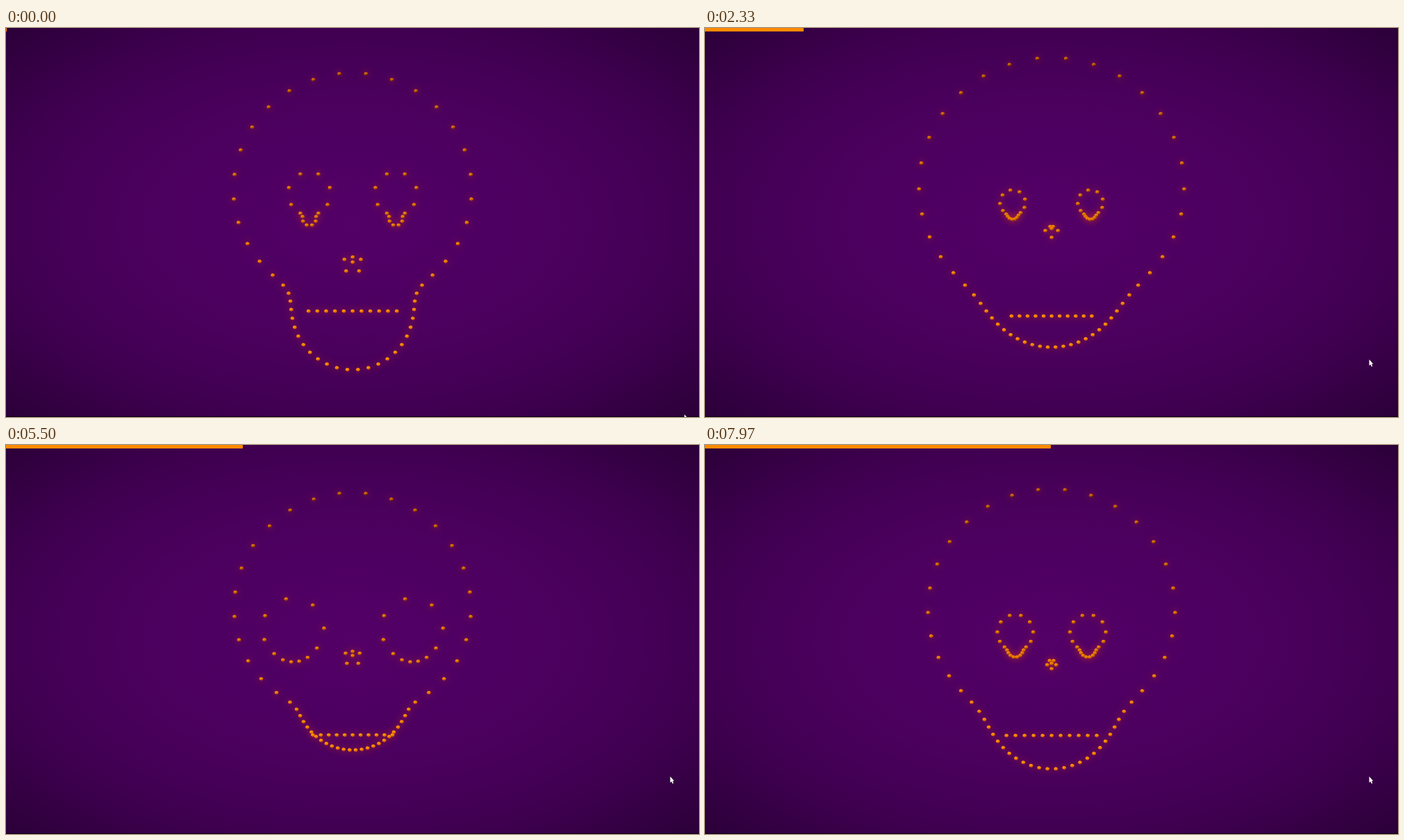
An HTML page with a canvas that plays this animation: 998 px wide and 561 px high, repeating every 7990 ms.

```html
<!DOCTYPE html>
<html lang="en">
<head>
<meta charset="utf-8">
<title>Skull generator</title>
<style>
  html, body { margin: 0; width: 100%; height: 100%; overflow: hidden; background: #2b0038; }
  canvas {
    display: block; width: 998px; height: 561px;
    background: radial-gradient(ellipse farthest-corner at 50% 50%,
      #530067, #4b005e 45%, #400051 71%, #2b0038);
  }
</style>
</head>
<body>
<canvas id="stage" width="998" height="561"></canvas>
<script>
const ctx = document.getElementById('stage').getContext('2d');
const DURATION = 7990;
const MID = 499.25;
const HEAD_Y = 371;
const FIRST_CLICK = 1400, CLICK_EVERY = 670, PRESS = 85;

// Shapes are radii [top, side, bottom] around a centre; a higher bend pinches the sides.
// Eyes: gap is the distance of each centre from the middle. Mouth: half width and height.
const round = {
  head: [306, 100, 122], bend: 18,
  eye: [59.5, 13, 17.7], eyeCount: 14, gap: 62.3, eyeY: 267.3,
  nose: [7.3, 14.2, 16], noseCount: 5, noseTurn: 90, noseY: 337.7,
  mouth: 63.6, mouthY: 408.3
};
const broad = {
  head: [328, 124.7, 89.5], bend: 13,
  eye: [32.8, 11.3, 9.5], eyeCount: 15, gap: 56, eyeY: 266.5,
  nose: [2.5, 8, 12.8], noseCount: 5, noseTurn: -90, noseY: 289.3,
  mouth: 57.8, mouthY: 415.6
};
const jawed = {
  head: [330, 105.7, 123.7], bend: 100,
  eye: [18.3, 13, 10.5], eyeCount: 15, gap: 55.2, eyeY: 290.4,
  nose: [8, 9, 9.6], noseCount: 4, noseTurn: 45, noseY: 282.8,
  mouth: 62.8, mouthY: 403.7
};
const pointed = {
  head: [302, 90.2, 69], bend: 70,
  eye: [72, 34.3, 20], eyeCount: 11, gap: 85.7, eyeY: 293,
  nose: [6, 12.3, 14.2], noseCount: 5, noseTurn: 90, noseY: 303.7,
  mouth: 57.3, mouthY: 418.2
};
const narrow = {
  head: [286.3, 112.7, 108], bend: 6.4,
  eye: [35.7, 23.8, 14.2], eyeCount: 17, gap: 60.2, eyeY: 292.4,
  nose: [7, 12, 13], noseCount: 4, noseTurn: 90, noseY: 309.7,
  mouth: 48.5, mouthY: 399.2
};
const smooth = {
  head: [307.3, 115.2, 96.2], bend: 14,
  eye: [46.7, 15.5, 14.6], eyeCount: 18, gap: 52.3, eyeY: 291.5,
  nose: [4.6, 6.3, 7.7], noseCount: 5, noseTurn: -90, noseY: 315,
  mouth: 65, mouthY: 419
};

function blend(a, b) {
  const face = { ...a };
  for (const key of ['head', 'eye']) face[key] = a[key].map((v, i) => (v + b[key][i]) / 2);
  for (const key of ['bend', 'gap', 'eyeY', 'noseY', 'mouth', 'mouthY']) face[key] = (a[key] + b[key]) / 2;
  return face;
}

const FACES = [
  round, blend(round, jawed), broad, blend(broad, jawed), jawed, blend(broad, pointed),
  blend(narrow, smooth), pointed, narrow, blend(narrow, broad), smooth
].map(beadsOf);

// Radius at a given sine of elevation: a tilt plus a hyperbola that is lowest at the sides
function radius([top, side, bottom], bend, s) {
  const rise = (Math.sqrt(1 + bend * s * s) - 1) / (Math.sqrt(1 + bend) - 1);
  return side + (top - bottom) / 2 * s + ((top + bottom) / 2 - side) * rise;
}

function ring(cx, cy, count, shape, bend = 5, turn = 0) {
  return Array.from({ length: count }, (_, k) => {
    const a = 2 * Math.PI * (k / count + turn / 360);
    const r = radius(shape, bend, Math.sin(a));
    return [cx + r * Math.cos(a), cy - r * Math.sin(a)];
  });
}

function beadsOf(f) {
  const eye = side => ring(MID + side * f.gap, f.eyeY, f.eyeCount, f.eye);
  const mouth = Array.from({ length: 11 }, (_, i) => [MID + f.mouth * (i / 5 - 1), f.mouthY]);
  return [
    ...ring(MID, HEAD_Y, 50, f.head, f.bend),
    ...eye(-1), ...eye(1),
    ...ring(MID, f.noseY, f.noseCount, f.nose, 5, f.noseTurn), [MID, f.noseY],
    ...mouth
  ];
}

function disc(x, y, rx, ry, tilt, fill) {
  ctx.fillStyle = fill;
  ctx.beginPath();
  ctx.ellipse(x, y, rx, ry, tilt, 0, 7);
  ctx.fill();
}

function drawHalo([x, y]) {
  const g = ctx.createRadialGradient(x, y, 2, x, y, 13);
  g.addColorStop(0, 'rgba(255,90,0,.09)');
  g.addColorStop(.4, 'rgba(255,70,0,.035)');
  g.addColorStop(1, 'rgba(255,60,0,0)');
  disc(x, y, 13, 13, 0, g);
}

// Beads higher up catch less light on their lower side
function drawBead([x, y]) {
  const lit = Math.min(1, Math.max(0, (y - 40) / 380));
  const mix = (a, b) => Math.round(a + (b - a) * lit);
  const g = ctx.createLinearGradient(x - 1, y - 2.4, x + 1, y + 2.5);
  g.addColorStop(0, `rgb(${mix(230, 255)},${mix(120, 155)},${mix(5, 14)})`);
  g.addColorStop(.5, `rgb(${mix(185, 255)},${mix(85, 136)},0)`);
  g.addColorStop(1, `rgb(${mix(40, 190)},${mix(8, 75)},${mix(14, 0)})`);
  disc(x, y, 2.8, 2.4, .3, g);
}

function drawCursor(x, y) {
  const shape = [[0, 0], [0, 9], [2, 7.2], [3.4, 10.4], [4.8, 9.8], [3.5, 6.8], [5.8, 6.4]];
  ctx.beginPath();
  shape.forEach(([dx, dy]) => ctx.lineTo(x + dx, y + dy));
  ctx.closePath();
  ctx.fillStyle = '#fff';
  ctx.strokeStyle = '#1a0022';
  ctx.lineWidth = .8;
  ctx.stroke();
  ctx.fill();
}

function draw(t) {
  ctx.clearRect(0, 0, 998, 561);
  const sinceFirst = t - FIRST_CLICK;
  const beads = FACES[Math.max(0, Math.floor(sinceFirst / CLICK_EVERY) + 1)];
  ctx.globalCompositeOperation = 'lighter';
  beads.forEach(drawHalo);
  ctx.globalCompositeOperation = 'source-over';
  beads.forEach(drawBead);

  ctx.fillStyle = '#0c0010';
  ctx.fillRect(0, 560, 998, 1);
  ctx.fillStyle = '#ff8a00';
  ctx.fillRect(0, 0, Math.max(1, Math.round(499 * Math.pow(t / DURATION, 1.02))), 5);

  const pressed = sinceFirst >= -PRESS && (sinceFirst + PRESS) % CLICK_EVERY < PRESS;
  if (pressed) disc(955.8, 477.7, 6.4, 6.4, 0, 'rgba(200,168,16,.75)');

  const away = Math.pow(1 - Math.min(1, t / 720), 2);
  drawCursor(956.5 + 20.5 * away, 478 + 79.5 * away);
}

const begin = performance.now();
function tick() {
  draw((performance.now() - begin) % DURATION);
  requestAnimationFrame(tick);
}
tick();
</script>
</body>
</html>
```
